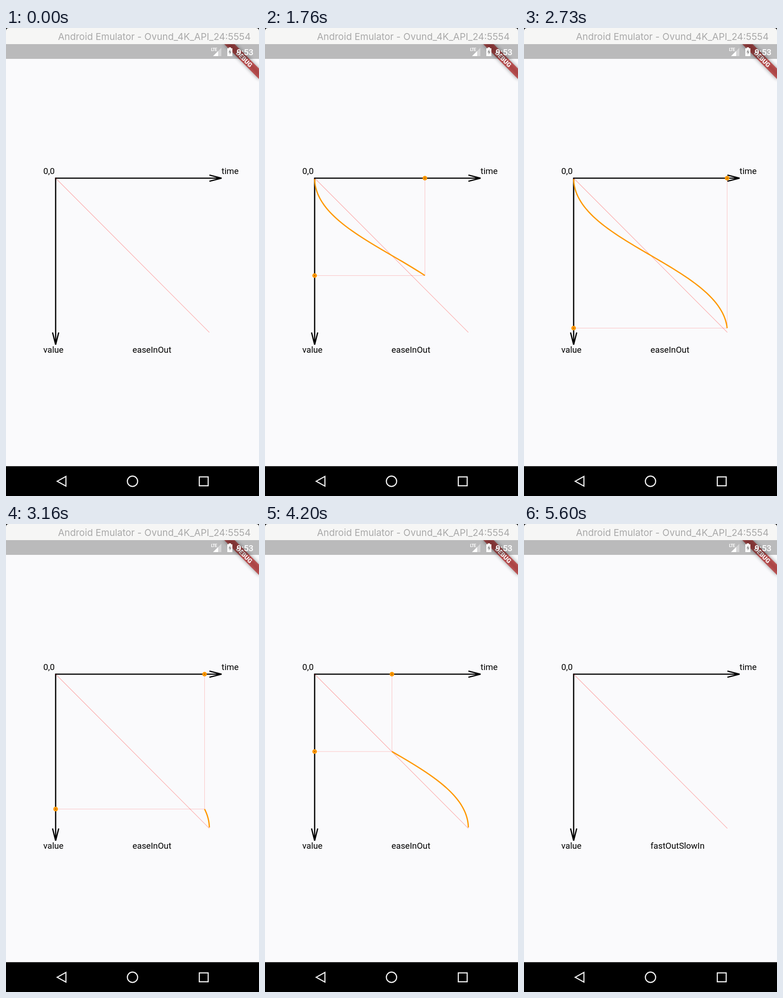
An HTML page for the animation above (5630 ms loop, 551 by 1016 pixels).

```html
<!DOCTYPE html>
<html lang="en">
<head>
<meta charset="utf-8">
<title>Easing curve</title>
<style>
  html, body { margin: 0; width: 100%; height: 100%; overflow: hidden; background: #000; }
  svg { display: block; width: 100%; height: 100%; }
  text { font-family: Roboto, sans-serif; font-size: 18.75px; }
  .axis { fill: none; stroke: #000; stroke-width: 2.7; }
  .hair { fill: none; stroke: #f00; stroke-opacity: .23; }
  .diagonal { stroke-width: 1.2; stroke-opacity: .32; }
  .nav { fill: none; stroke: #f2f2f2; stroke-width: 2.4; }
</style>
</head>
<body>
<svg viewBox="0 0 551 1016">
  <defs>
    <filter id="blur" x="-20%" y="-100%" width="140%" height="300%"><feGaussianBlur stdDeviation="4"/></filter>
    <clipPath id="screen"><rect y="35" width="551" height="917"/></clipPath>
    <g id="dot"><circle r="5" fill="#ff9800"/><circle r="1.3" fill="#a86400"/></g>
  </defs>

  <!-- window title -->
  <path d="M0 35V6Q0 0 6 0H545Q551 0 551 6V35Z" fill="#f6f6f5"/>
  <text x="533" y="26" text-anchor="end" fill="#a9a9a9" style="font-family:Inter,sans-serif;font-size:20.5px">Android Emulator - Ovund_4K_API_24:5554</text>

  <!-- app surface and corner banner -->
  <g clip-path="url(#screen)">
    <rect y="35" width="551" height="917" fill="#fafafc"/>
    <g transform="translate(551 35) rotate(45)">
      <rect x="-54" y="37.5" width="108" height="16" fill="#000" opacity=".42" filter="url(#blur)"/>
      <rect x="-54" y="37.5" width="108" height="16" fill="#b71c1c" fill-opacity=".66"/>
      <text y="50.3" text-anchor="middle" fill="#fff" style="font-size:13.6px;font-weight:900">DEBUG</text>
    </g>
  </g>

  <!-- status bar -->
  <rect y="35" width="551" height="32" fill="#000" opacity=".26"/>
  <g fill="#fff">
    <text x="446.5" y="50" style="font-size:9px;font-weight:700;letter-spacing:-.6px">LTE</text>
    <path d="M469 43V61H451Z" opacity=".4"/>
    <path d="M462 50V61H451Z"/>
    <path d="M482 44H485V42H490V44H493V61H482Z"/>
    <path d="M488.5 46L484.5 53H487V58L491 51H488.5Z" fill="#999"/>
    <text x="502" y="58.5" style="font-weight:500">9:53</text>
  </g>

  <!-- chart -->
  <path class="axis" d="M108.1 326H469.500M443 319.300L469.500 326L443 332.700"/>
  <path class="axis" d="M108.1 324.700V687.500M101.400 661L108.1 687.500L114.800 661"/>
  <path class="hair diagonal" d="M108.1 326L442.900 660.800"/>
  <text x="81.3" y="316.700">0,0</text>
  <text x="469.6" y="316.700">time</text>
  <text x="81.3" y="705">value</text>
  <text id="label" x="275.5" y="705"></text>
  <g id="trace">
    <path id="guides" class="hair"/>
    <path id="curve" fill="none" stroke="#ff9800" stroke-width="2.7"/>
    <use id="dotX" href="#dot"/>
    <use id="dotY" href="#dot"/>
  </g>

  <!-- navigation bar -->
  <rect y="951.3" width="551" height="65" fill="#000"/>
  <path class="nav" d="M111.500 984L130.500 973.500V994.500Z"/>
  <circle class="nav" cx="275.5" cy="984" r="11.2"/>
  <rect class="nav" x="421" y="974.5" width="19.3" height="19.3"/>
</svg>
<script>
const LOOP = 5630, SWITCH = 5600, FPS = 30;
const LEFT = 108.1, TOP = 326, SIZE = 334.8;
const [label, trace, guides, curve, dotX, dotY] =
  ['label', 'trace', 'guides', 'curve', 'dotX', 'dotY'].map(id => document.getElementById(id));

// cubic-bezier(.42, 0, .58, 1), solved by bisection
function easeInOut(p) {
  let low = 0, high = 1, s = .5;
  for (let i = 0; i < 24; i++) {
    s = (low + high) / 2;
    const x = 3 * .42 * s * (1 - s) ** 2 + 3 * .58 * s * s * (1 - s) + s ** 3;
    if (x < p) low = s; else high = s;
  }
  return s * s * (3 - 2 * s);
}

const point = p => [LEFT + SIZE * easeInOut(p), TOP + SIZE * p];

// Forward over 0..1, backward over 1..2, slightly quicker on the way back
const phaseAt = t => Math.min(2, Math.max((t + 24.5) / 2836, 1.1254 + (t - 3167) * .000361));

// Ticks start on multiples of 10 ms
const tickAt = t => Math.floor((Math.floor(t / 10) * 10 + 9) * FPS / 1000);

function draw(t) {
  const tick = tickAt(t), done = t >= SWITCH;
  label.textContent = done ? 'fastOutSlowIn' : 'easeInOut';
  trace.style.display = tick === 0 || done ? 'none' : '';

  const phase = phaseAt(tick * 1000 / FPS);
  const start = phase > 1 ? .994 : .006;
  const p = phase > 1 ? 2 - phase : phase;
  const [x, y] = point(p);
  const steps = 60;
  const path = Array.from({ length: steps + 1 }, (_, i) => point(start + (p - start) * i / steps));

  curve.setAttribute('d', 'M' + path.map(q => q.map(v => v.toFixed(2))).join('L'));
  guides.setAttribute('d', `M${x} ${TOP}V${y}H${LEFT}`);
  dotX.setAttribute('transform', `translate(${x} ${TOP})`);
  dotY.setAttribute('transform', `translate(${LEFT} ${y})`);
}

const origin = performance.now();
function frame() {
  draw((performance.now() - origin) % LOOP);
  requestAnimationFrame(frame);
}
frame();
</script>
</body>
</html>
```
